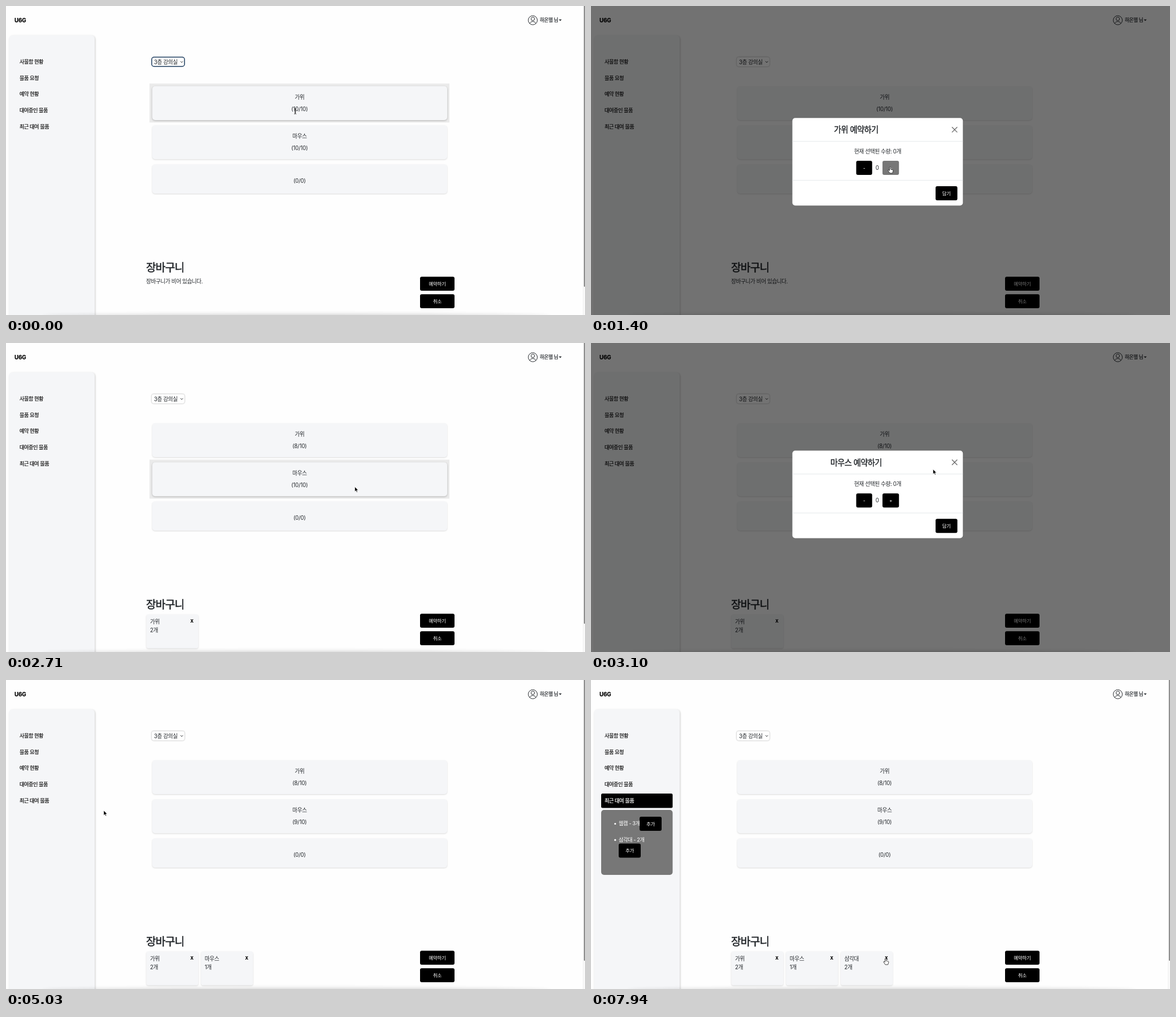
Write an HTML page that moves like this. It is 1025x547 px and loops after 8000 ms.

```html
<!DOCTYPE html>
<html lang="ko">
<head>
<meta charset="utf-8">
<title>물품 예약</title>
<style>
  html, body { margin: 0; width: 100%; height: 100%; overflow: hidden; background: #fefefe; }
  svg { display: block; width: 1025px; height: 547px; }
  text { font-family: Inter, "Noto Sans CJK KR", "Noto Sans KR", "Noto Sans CJK JP", sans-serif; letter-spacing: -.045em; }
  .num { letter-spacing: -.02em; }
  .mid { text-anchor: middle; }
  .medium { stroke: currentColor; stroke-width: .026em; }
  .card { filter: drop-shadow(0 1px 1px rgba(0,0,0,.14)); }
  .lift { filter: drop-shadow(0 1px 1.5px rgba(0,0,0,.24)); }
  .side { filter: drop-shadow(1px 1px 1.5px rgba(0,0,0,.2)); }
  .select { filter: drop-shadow(0 .6px 1px rgba(0,0,0,.4)); }
  .dock { opacity: .24; filter: blur(4px); }
</style>
</head>
<body>
<svg id="stage" viewBox="0 0 1025 547"></svg>
<script>
const LOOP = 8000;
const INK = '#212529', PANEL = '#f5f6f8', HOVER = '#777';
const W = 1025, H = 547;

// Places the pointer visits
const spot = {
  scissors: [512, 186], plus: [529.5, 285], put: [630.5, 331.5], row: [617.5, 254.5], rowTop: [605.5, 223.5],
  sideEdge: [173, 231], recent: [91, 212], addTripod: [68, 299], leave: [160, 279], thirdRow: [445, 346],
  remove: [521.5, 493],
};
// Pointer moves: start, end, destination
const moves = [
  [390, 1050, 'plus'], [1810, 2300, 'put'], [2570, 2710, 'row'], [2710, 2840, 'rowTop'],
  [3100, 3540, 'plus'], [3790, 4110, 'put'], [4560, 5030, 'sideEdge'], [5030, 5290, 'recent'],
  [5430, 6000, 'addTripod'], [6550, 6940, 'leave'], [7010, 7350, 'thirdRow'], [7610, 7940, 'remove'],
];

// The dialog is already this far into its fade when it is first seen
const LEAD = 80;
const dialogs = [
  { name: '가위', open: 390, close: 2640, clicks: [1470, 1660] },
  { name: '마우스', open: 3015, close: 4310, clicks: [3770] },
];
const MENU_OPEN = 5430, TRIPOD_ADDED = 6250;

const menu = ['사물함 현황', '물품 요청', '예약 현황', '대여중인 물품', '최근 대여 물품'];
const cart = [
  { name: '가위', count: 2, since: dialogs[0].close },
  { name: '마우스', count: 1, since: dialogs[1].close },
  { name: '삼각대', count: 2, since: TRIPOD_ADDED },
];

const clamp = v => Math.max(0, Math.min(1, v));
const smooth = v => v * v * (3 - 2 * v);
const easeOut = v => 1 - Math.pow(1 - clamp(v), 1.7);

const rect = (x, y, w, h, r, fill, extra = '') =>
  `<rect x="${x}" y="${y}" width="${w}" height="${h}" rx="${r}" fill="${fill}" ${extra}/>`;
const text = (s, x, cy, size = 9.7, cls = '', fill = INK, weight = 400) =>
  `<text x="${x}" y="${cy + size * .37}" font-size="${size}" class="${cls}" fill="${fill}" color="${fill}" font-weight="${weight}">${s}</text>`;
const line = (d, color, width) => `<path d="${d}" fill="none" stroke="${color}" stroke-width="${width}"/>`;

function pointerAt(t) {
  let [x, y] = spot.scissors;
  for (const [from, to, name] of moves) {
    const k = smooth(clamp((t - from) / (to - from)));
    x += (spot[name][0] - x) * k;
    y += (spot[name][1] - y) * k;
  }
  return [x, y];
}

function dialogAt(t) {
  const d = dialogs.find(d => t >= d.open && t < d.close + 150 - LEAD);
  if (!d) return null;
  const closing = t >= d.close;
  const age = t - (closing ? d.close : d.open) + LEAD;
  const slide = easeOut(age / 300), fade = clamp(age / 150);
  return {
    name: d.name,
    count: d.clicks.filter(c => t >= c).length,
    shift: -30.2 * (closing ? slide : 1 - slide),
    alpha: closing ? 1 - fade : fade,
  };
}

function screen(t) {
  const [px, py] = pointerAt(t);
  const dialog = dialogAt(t);
  const idle = t < dialogs[0].open;
  let hand = false;
  const over = (x, y, w, h) => px >= x && px <= x + w && py >= y && py <= y + h;
  const hot = (inDialog, x, y, w, h) => {
    const hit = inDialog === !!dialog && over(x, y, w, h);
    hand = hand || hit;
    return hit;
  };
  const button = (label, x, y, w, h, inDialog = false) =>
    rect(x, y, w, h, 3, hot(inDialog, x, y, w, h) ? HOVER : '#000') +
    text(label, x + w / 2, y + h / 2, 8.5, 'mid', '#fff');

  const header = () =>
    text('U6G', 15, 25.3, 9.8, 'num', '#000', 800) +
    `<g fill="none" stroke="${INK}"><circle cx="932.6" cy="25.2" r="8"/><circle cx="932.6" cy="22.8" r="3.1"/>
     <path d="M927 30.8q1.6-3.4 5.6-3.4t5.6 3.4"/></g>` +
    text('하온별 님', 945, 25.2, 8.7, 'medium') +
    `<path d="M978.6 23.8h5.2l-2.6 2.8z" fill="${INK}"/>`;

  const lent = (label, y, bx, by) =>
    `<circle cx="42.8" cy="${y + .5}" r="1.6" fill="#fff"/>` +
    text(label, 49, y, 9.2, '', '#fff') + button('추가', bx, by, 39, 25);

  const sidebar = () => {
    const opened = t >= MENU_OPEN;
    let s = rect(5.5, 52, 151.5, 505, 6, PANEL, 'class="side"');
    menu.forEach((label, i) => {
      const y = 98.5 + i * 28.8, active = opened && i === menu.length - 1;
      hot(false, 18, y - 12.7, 126.5, 25.5);
      if (active) s += rect(18, y - 12.7, 126.5, 25.5, 2.5, '#000');
      s += text(label, 24, y, 9.15, 'medium', active ? '#fff' : '#111');
    });
    if (opened) {
      s += rect(18, 230, 126.5, 115, 5, HOVER) +
        lent('웹캠 - 3개', 254, 86, 242) + lent('삼각대 - 2개', 282.7, 49, 289.5);
    }
    return s;
  };

  const picker = () =>
    rect(258, 90.5, 58, 16.5, 4, '#fff', idle ? 'stroke="#1d3c5e" stroke-width="1.5"' : 'class="select"') +
    text('3층 강의실', 262, 99) + line('M308.8 97.8l2.3 2.3 2.3-2.3', INK, .9);

  const stockRow = (name, amount, i) => {
    const y = 142 + i * 69.2, h = name ? 60 : 51.5;
    const lit = !dialog && over(254, y - 4.7, 531, h + 9);
    return (lit ? rect(254, y - 4.7, 531, h + 9, 0, '#ebebeb') : '') +
      rect(259, y, 522, h, 5, PANEL, `class="card${lit ? ' lift' : ''}"`) +
      text(name, 519.7, y + 19.5, 9.7, 'mid') +
      text(`(${amount})`, 519.7, y + (name ? 40.7 : 29), 9.7, 'mid num');
  };
  const stock = () =>
    stockRow('가위', t < dialogs[0].close ? '10/10' : '8/10', 0) +
    stockRow('마우스', t < dialogs[1].close ? '10/10' : '9/10', 1) +
    stockRow('', '0/0', 2);

  const basket = () => {
    const items = cart.filter(c => t >= c.since);
    let s = text('장바구니', 248, 463, 19.3, 'medium');
    if (!items.length) s += text('장바구니가 비어 있습니다.', 248, 487);
    items.forEach(({ name, count }, i) => {
      const x = 248.5 + i * 96.8;
      hot(false, x + 76, 487, 9, 11);
      s += rect(x, 480.5, 92, 60, 4, PANEL, 'class="card"') +
        text(name, x + 6.5, 493) + text(count + '개', x + 6.5, 508) +
        text('X', x + 80.6, 491.8, 7.6, 'mid', '#000', 800);
    });
    return s + button('예약하기', 733, 479.3, 61, 24.8) + button('취소', 733, 510.2, 61, 24.8);
  };

  const modal = ({ name, count, shift, alpha }) => {
    const dx = count === 1 ? .8 : 0;
    return rect(0, 0, W, H, 0, '#000', `opacity="${alpha * .55}"`) +
      `<g opacity="${alpha}" transform="translate(0 ${shift})">` +
      rect(356.5, 198.2, 301.8, 155, 5, '#fff') +
      line('M356.5 239.6h301.8M356.5 308.6h301.8', '#dee2e6', .8) +
      text(name + ' 예약하기', 469.3, 219, 14.3, 'mid medium') +
      line('M639 214.2l9.4 9.4m0-9.4l-9.4 9.4', '#6a6a6a', 1.3) +
      text(`현재 선택된 수량: ${count}개`, 507.4, 257.2, 9.75, 'mid') +
      button('-', 469.5 + dx, 274, 28.2, 25, true) +
      text(count, 506.7, 286.3, 9.7, 'mid num') +
      button('+', 516 - dx, 274, 29.2, 25, true) +
      button('담기', 610, 319, 38.6, 25, true) + '</g>';
  };

  const scrollbar = () =>
    rect(1021.8, 0, 3.2, H, 0, '#fafafa') + rect(1021.6, 0, .6, H, 0, '#e4e4e4') +
    rect(1023, -3, 2.4, 500, 1.2, '#8c8c8c');

  const pointer = () => {
    const beam = line('M-2-4.6q2 0 2 1.2V4q0 1.2-2 1.2M2-4.6q-2 0-2 1.2V4q0 1.2 2 1.2M-1 1.5h2', '#222', .9);
    const finger = '<path d="M-1 .8q0-1.2 1-1.2t1 1.2v3.2l3.1.7q1.5.4 1.3 2l-.5 2-.8 2.2h-4.5l-2.3-3.2q-1.6-1.8-.6-2.3 1-.3 2.3 1z" fill="#fff" stroke="#111" stroke-width=".8" stroke-linejoin="round"/>';
    const arrow = '<path d="M0 0v8.6l2-1.8 1.4 3 1.4-.6-1.4-2.9h2.7z" stroke="#fff" stroke-width=".6"/>';
    return `<g transform="translate(${px} ${py})">${idle ? beam : hand ? finger : arrow}</g>`;
  };

  return rect(0, 0, W, H, 0, '#fefefe') + header() + sidebar() + picker() + stock() + basket() +
    (dialog ? modal(dialog) : scrollbar()) +
    '<ellipse class="dock" cx="514" cy="552" rx="450" ry="5"/>' + pointer();
}

const stage = document.getElementById('stage');
const start = performance.now();
let shown = '';

function draw() {
  const next = screen((performance.now() - start) % LOOP);
  if (next !== shown) stage.innerHTML = shown = next;
  requestAnimationFrame(draw);
}
draw();
</script>
</body>
</html>
```
